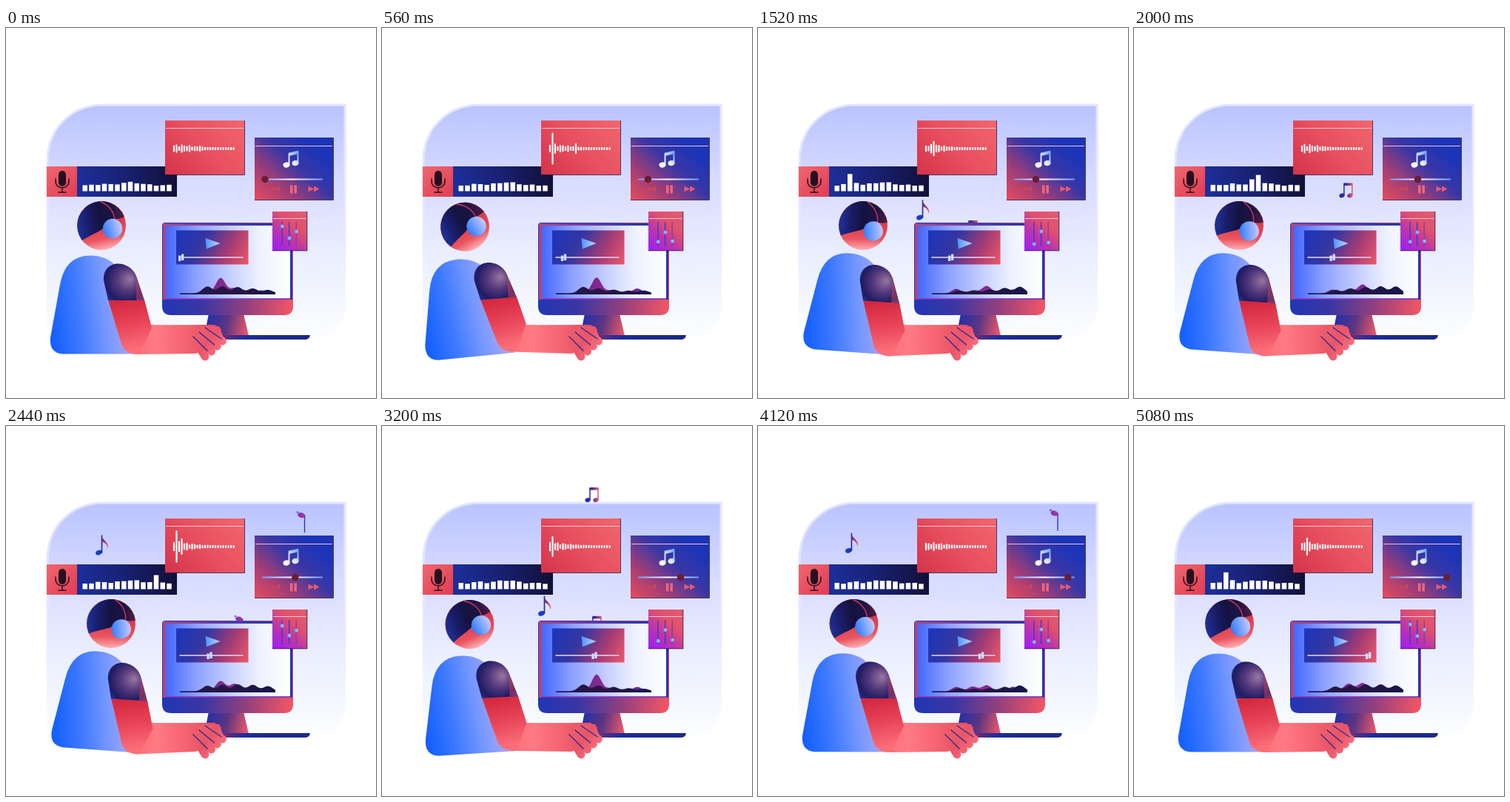
An HTML page with a canvas for the animation above (5.12 s loop, 500 px wide and 500 px high).

```html
<!DOCTYPE html>
<html lang="en">
<head>
<meta charset="utf-8">
<title>Music studio</title>
<style>
html, body { margin: 0; width: 100%; height: 100%; overflow: hidden; background: #fff; }
canvas { display: block; width: 100vw; height: 100vh; }
</style>
</head>
<body>
<canvas id="stage" width="500" height="500"></canvas>
<script>
const ctx = document.getElementById('stage').getContext('2d');
const LOOP = 5120;

// ---------- drawing helpers ----------
function lin(x0, y0, x1, y1, ...colors) {
  const g = ctx.createLinearGradient(x0, y0, x1, y1);
  colors.forEach((c, i) => g.addColorStop(i / (colors.length - 1), c));
  return g;
}
function rect(x, y, w, h, fill) {
  ctx.fillStyle = fill;
  ctx.fillRect(x, y, w, h);
}
function shape(d, fill, stroke, width = 1) {
  const p = new Path2D(d);
  if (fill) { ctx.fillStyle = fill; ctx.fill(p); }
  if (stroke) {
    ctx.strokeStyle = stroke;
    ctx.lineWidth = width;
    ctx.lineCap = ctx.lineJoin = 'round';
    ctx.stroke(p);
  }
}
function line(x0, y0, x1, y1, stroke, width) {
  shape(`M${x0} ${y0}L${x1} ${y1}`, null, stroke, width);
}
function oval(x, y, rx, ry, fill, turn = 0) {
  ctx.fillStyle = fill;
  ctx.beginPath();
  ctx.ellipse(x, y, rx, ry, turn, 0, 7);
  ctx.fill();
}
function at(x, y, turn, draw) {
  ctx.save();
  ctx.translate(x, y);
  ctx.rotate(turn);
  draw();
  ctx.restore();
}
function card(x, y, w, h, fill, rule) {
  rect(x, y, w + 0.8, h + 0.8, '#241640');
  rect(x, y, w, h, fill);
  rect(x + 1, y + rule, w - 2, 1, '#f3c3d2');
}

// ---------- motion helpers ----------
const clamp = v => Math.max(0, Math.min(1, v));
const mix = (a, b, f) => a + (b - a) * f;
const smooth = f => (1 - Math.cos(Math.PI * clamp(f))) / 2;
const bell = (distance, width) => Math.exp(-((distance / width) ** 2));
const wave = (t, peak, period) => Math.cos((t - peak) / period * 2 * Math.PI);

// ---------- scenery ----------
function backdrop() {
  rect(0, 0, 500, 500, '#fff');
  const d = 'M56 430V180C56 134 90 104 132 104H458V372C458 400 444 416 424 418';
  shape(d, lin(0, 104, 0, 416, '#bac3ff', '#d8dcff', '#ebeffe', '#fbfdff'));
  shape(d, null, lin(0, 104, 0, 425, '#e2e5ff', '#e6e9ff', '#ffffff'), 3);
}

// ---------- floating notes ----------
function eighthNote() {
  oval(-3.5, 10, 4.5, 3.2, '#1c3cc8', -0.4);
  line(0.5, 10, 0.5, -13, '#1c2c8c', 1.6);
  shape('M0-13C2-6 11-4 9 5C8-1 4-4 0-5Z', lin(0, 0, 9, 0, '#4a2a90', '#f0525f'));
}
function beamedNote() {
  const tint = lin(-9, 0, 9, 0, '#1c2fb4', '#3a2a90', '#f0606a');
  oval(-6, 17, 3.6, 2.9, tint, -0.3);
  oval(5, 17, 3.6, 2.9, tint, -0.3);
  shape('M-3 17V1.5H8V17', null, tint, 1.5);
  rect(-3.5, 0, 12, 3.5, tint);
}
function droppedNote() {
  oval(-5, -4, 1.4, 1.1, '#5a3ad0');
  oval(0, 0, 5, 3.4, lin(-5, 0, 5, 0, '#6a2ee0', '#d0306e'), 0.3);
  line(4.5, 0, 4.5, 23, '#2a3ab4', 1.4);
}
// Each note rises twice, from behind the screen along a straight path.
function floatNote(t, start, lead, rise, from, to, span, draw) {
  for (const first of [start, start + 1650]) {
    const age = t - first;
    if (age < -lead || age > rise + 130) continue;
    const f = Math.min(age, rise) / span;
    ctx.globalAlpha = 1 - clamp((age - rise) / 130);
    at(mix(from[0], to[0], f), mix(from[1], to[1], f), 0, draw);
    ctx.globalAlpha = 1;
  }
}
function notes(t) {
  floatNote(t, 1520, 350, 1150, [222, 246], [129, 161], 920, eighthNote);
  floatNote(t, 1520, 200, 1720, [288, 260], [284, 83], 1680, beamedNote);
  floatNote(t, 790, 150, 1720, [315, 261], [399, 120.5], 1650, droppedNote);
}

// ---------- microphone level ----------
function microphone(t) {
  rect(55, 187, 41, 41, lin(55, 187, 96, 228, '#f0666f', '#e23c52'));
  rect(96, 187, 135, 41, lin(96, 215, 231, 195, '#1d2f9c', '#182070', '#120f35'));
  const ink = '#24101f';
  shape('M76 198V209', null, ink, 10);
  shape('M67 204V207C67 219 85 219 85 207V204M76 216V222M71 222H81', null, ink, 1.5);

  // A peak runs along the bars, shrinking as it goes.
  const peak = 2 + ((t + 2040) % 3560) / 102;
  for (let i = 0; i < 14; i++) {
    const h = 8 + 4 * bell(i - 7, 2.2) + 2 * bell(i - 2.7, 0.9) + 0.8 * Math.sin(t / 150 + i * 2.1)
      + (t > 1300 ? mix(14, 9, peak / 14) * bell(i - peak, 0.7) : 0);
    rect(103.5 + i * 8.75, 220.5 - h, 6.5, h, '#fff');
  }
}

// ---------- waveform ----------
const BEATS = [ // line, time, height
  [1, 560, 35], [10, 330, 19], [3, 1520, 14], [1, 2440, 37], [3, 2440, 14], [1, 3200, 20], [2, 5040, 18]
];
function waveform(t) {
  card(215, 125, 107, 73, lin(225, 200, 312, 123, '#d6364c', '#e8505f', '#f0646c'), 10);
  for (let i = 0; i < 24; i++) {
    let h = 4 + 5 * bell(i - 2, 7) * (1 + 0.6 * Math.sin(i * 2.4 + t / 160));
    for (const [at, time, size] of BEATS) h += size * bell(i - at, 0.6) * bell(t - time, 250);
    line(227 + i * 3.5, 164 - h / 2, 227 + i * 3.5, 162 + h / 2, '#fff', 2.2);
  }
}

// ---------- music player ----------
function player(t) {
  card(336, 148, 106, 84, lin(346, 238, 416, 160, '#e24b5e', '#a03d76', '#3b37a4', '#1c34b8'), 11);
  const tint = lin(375, 188, 396, 166, '#ffffff', '#dfe8ff', '#5c9dff');
  oval(379, 185, 4.5, 3.6, tint, -0.3);
  oval(391, 182.5, 4.5, 3.6, tint, -0.3);
  shape('M382.5 185V169.5L394.5 166.5V182.5', null, tint, 1.8);
  shape('M382 169L395 166V170L382 173Z', tint);

  line(347, 204.5, 427, 204.5, lin(347, 0, 427, 0, '#6f9cff', '#ffffff', '#6f9cff'), 2);
  oval(350 + 73 * clamp(t / 4360), 204.5, 4.7, 4.7, '#6a1c33');
  shape('M362 213.5V221.5L355 217.5ZM370 213.5V221.5L362 217.5Z', '#c94463');
  rect(384, 212.5, 3.4, 11, '#f0687a');
  rect(389.5, 212.5, 3.4, 11, '#f0687a');
  shape('M408.5 213.5V221.5L416 217.5ZM416 213.5V221.5L423.5 217.5Z', '#e85a70');
}

// ---------- computer ----------
function ridge(size, fill) {
  let d = 'M235 360';
  for (let x = 235; x <= 364; x += 1.5) d += `L${x} ${358.5 - size(x)}`;
  shape(d + 'L364 360Z', fill);
}
function hills(t) {
  const swell = (mean, swing, peak) => mean + swing * wave(t, peak, 2800);
  ridge(x => swell(4, 2, 1500) * bell(x - 268, 8) + swell(13, 10, 300) * bell(x - 290, 9)
    + swell(8, 4, 2000) * bell(x - 309, 9) + swell(5, 2, 900) * bell(x - 345, 9),
    lin(235, 0, 364, 0, '#4a1f7a', '#8b2a96', '#63259a'));
  ridge(x => {
    let h = 0;
    for (let i = 0; i < 5; i++) h += swell(6.5, 3, 3000 - 300 * i) * bell(x - 272 - 20.5 * i, 9);
    return h;
  }, lin(235, 0, 364, 0, '#1c1c4c', '#271544', '#16164a'));
}
function computer(t) {
  shape('M274 386H321L328 416H268Z', lin(268, 395, 328, 410, '#1c2fae', '#5d3580', '#f0586a'));
  shape('M292 415H411Q410 421 404 421H286Z', lin(286, 0, 360, 0, '#7a3070', '#1d2c9e', '#1a2888'));
  shape('M215 263H384Q388 263 388 267V376Q388 388 376 388H223Q211 388 211 376V267Q211 263 215 263Z',
    lin(211, 330, 388, 350, '#1f36b6', '#3a36a4', '#93407c', '#f05566'));
  rect(212, 264, 175, 103, lin(212, 320, 387, 310, '#b24482', '#7a3a9c', '#3538b0', '#1f34b0'));
  rect(216, 267, 168, 98.5, lin(216, 0, 384, 0, '#4468ff', '#8ea2ff', '#c2ccff', '#eef1ff', '#ffffff'));
  rect(216, 365.5, 168, 1.5, '#8432b8');

  rect(230, 273.5, 97.5, 46, lin(235, 278, 325, 325, '#1d35b8', '#36369f', '#a33b74', '#ee5a68'));
  shape('M269.5 284L289.5 291L271 298.5Z', lin(269, 0, 289, 0, '#4a94ff', '#b9d5ff'));
  line(235, 310, 320, 310, '#e8dcf4', 1.6);
  const x = 237 + 80 * t / 5080;
  rect(x - 4, 307.5, 3.3, 7.5, '#cfe0ff');
  rect(x, 305.5, 3.3, 8.5, '#cfe0ff');
  hills(t);
}

function mixer(t) {
  card(360, 248, 46.5, 52.5, lin(364, 298, 403, 252, '#a31ff0', '#b834b0', '#e0506e', '#e25a70'), 9);
  const push = Math.abs(wave(t, 0, LOOP)) ** 8;
  [[292, -24], [275, 9], [290, -15]].forEach(([rest, swing], i) => {
    const x = 373 + i * 9.6;
    line(x, 263, x, 294, i < 2 ? '#4a36b8' : '#8c3c92', 1.4);
    oval(x, rest + swing * push, 2.4, 2.4, lin(x - 3, 0, x + 3, 0, '#3f9cff', '#a6dcff'));
  });
}

// ---------- person ----------
// Lean left, then right and hold, left again, and settle.
const POSES = [[0, 0], [560, -17], [1420, 13], [2800, 13], [3360, -16], [4040, 0.5], [LOOP, 0]];
function leanAt(t) {
  const next = POSES.findIndex(([time]) => time > t);
  const [t0, a] = POSES[next - 1], [t1, b] = POSES[next];
  return mix(a, b, smooth((t - t0) / (t1 - t0)));
}
function head(lean) {
  at(129 + lean, 267 + Math.max(0, -lean) * 0.1, lean * 0.018, () => {
    oval(0, 0, 33, 33, lin(-4, -12, 6, 33, '#c5354a', '#e0404f', '#ea5560', '#ffb4b8'));
    shape('M-26 20A33 33 0 1 1 31-12C27-10 24-9 19-9L2 4C-2 8-14 12-26 20Z',
      lin(-33, 6, 33, -6, '#1f329c', '#191d68', '#15123f', '#191446', '#5a1c42'));
    shape('M-1-32C10-28 18-18 18-6', null, '#d0344c', 1.5);
    oval(15, 4, 13.2, 13.2, lin(2, 8, 28, 0, '#2e7bff', '#7ba4ff', '#c6ccff'));
  });
}
function body(lean) {
  at(160, 440.5, lean / 172, () => {
    shape('M-2 0H-84Q-102-2-100-22L-87-94Q-80-133-46-133C-18-133 0-115 6-80L20 0Z',
      lin(-100, -50, 6, -62, '#1560ff', '#3b78ff', '#7396ff', '#a6a9f4'));
  });
}
function arm(lean) {
  // The forearm stays on the desk while the upper arm swings about the elbow.
  const drop = lean * 0.2;
  shape(`M165 400C200 402 240 401 282 401L291 407L285 430L256 440L176 ${441 + drop}Q158 ${439 + drop} 158 420Z`,
    lin(160, 0, 292, 0, '#fa6c76', '#ff7a82', '#f2606e', '#d9485f'));
  at(172, 431 + drop, lean * 0.0048, () => {
    shape('M-34-64H15L25-26L10 8Q-10 13-16-4Z', lin(-8, -64, 6, 2, '#d4283f', '#e84458', '#fb6e78'));
    const glow = ctx.createRadialGradient(-4, -92, 1, -12, -88, 36);
    glow.addColorStop(0, '#94749c');
    glow.addColorStop(0.4, '#54387c');
    glow.addColorStop(0.75, '#201c62');
    glow.addColorStop(1, '#21389e');
    shape('M-34-63L-40-90C-42-119-5-119 4-96L15-63Z', glow);
    shape('M4-96L15-63H4Z', '#c2405c88');
  });
}
function hand() {
  const skin = lin(250, 405, 298, 440, '#f4606e', '#ea5468', '#ff7a84');
  shape('M250 424L264 403H288L296 424L270 442Z', skin);
  for (let i = 0; i < 4; i++)
    line(257 + 6 * i, 424 - 5 * i, 269 + 9 * i - i * i * 0.4, 444 - 7 * i, skin, 11);
  for (let i = 0; i < 3; i++)
    line(253 + 8 * i, 417 - 6 * i, 272 + 9.5 * i, 436 - 8 * i, '#24318f', 1.5);
}

function draw(t) {
  const lean = leanAt(t);
  backdrop();
  notes(t);
  microphone(t);
  waveform(t);
  player(t);
  computer(t);
  mixer(t);
  body(lean);
  head(lean);
  arm(lean);
  hand();
}

const begin = performance.now();
function tick() {
  const t = (performance.now() - begin) % LOOP;
  draw(Math.floor(t / 40) * 40);
  requestAnimationFrame(tick);
}
tick();
</script>
</body>
</html>
```
